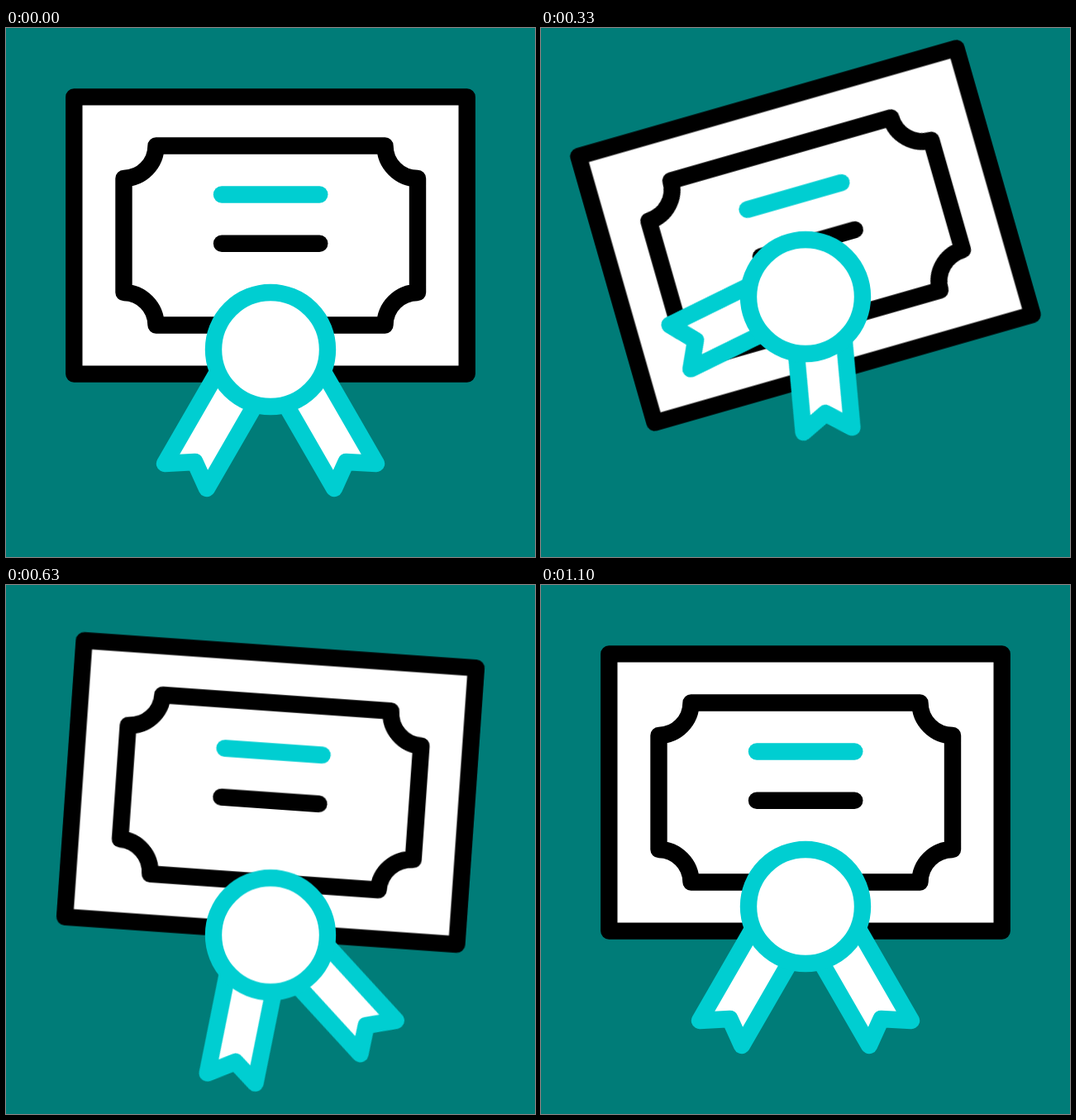
An HTML page without scripts that plays this animation: 640x640 px, repeating every 1670 ms.

```html
<!DOCTYPE html>
<html lang="en">
<head>
<meta charset="utf-8">
<title>Certificate</title>
<style>
  html, body { margin: 0; width: 100%; height: 100%; overflow: hidden; background: #007c78; }
  svg { display: block; width: 100%; height: 100%; }
  .ink, .accent { fill: #fff; stroke: #000; stroke-width: 20.4; stroke-linecap: round; stroke-linejoin: round; }
  .accent { stroke: #00ced1; }

  .cert, .medal, .left, .right, .slide {
    animation: 1.67s cubic-bezier(.37, 0, .63, 1) infinite;
  }
  .cert { transform-origin: 320px 251px; animation-name: rock; }
  .medal { animation-name: bounce; }
  .left { animation-name: swing-left; }
  .right { animation-name: swing-right; }
  .slide { animation-name: slide; }

  @keyframes rock {
    0%, 65.27%, 100% { transform: rotate(0deg); }
    20.36% { transform: rotate(-16deg); }
    32.93% { transform: rotate(7.5deg); }
    44.91% { transform: rotate(-2.4deg); }
    55.69% { transform: rotate(1.75deg); }
  }
  @keyframes bounce {
    0%, 7.96%, 65.87%, 100% { transform: translate(320px, 389px); }
    25.93% { transform: translate(320px, 303px); }
    36.95% { transform: translate(320px, 424px); }
    52.51% { transform: translate(320px, 343px); }
  }
  @keyframes swing-left {
    0%, 8.38%, 65.87%, 100% { transform: rotate(0deg); }
    21.98% { transform: rotate(36deg); }
    40.72% { transform: rotate(-22deg); }
    58.68% { transform: rotate(6deg); }
  }
  @keyframes swing-right {
    0%, 7.19%, 65.87%, 100% { transform: rotate(0deg); }
    20.96% { transform: rotate(25.2deg); }
    35.93% { transform: rotate(-13deg); }
    55.09% { transform: rotate(7.5deg); }
  }
  /* ribbons slip up along their own axis behind the seal */
  @keyframes slide {
    0%, 6.59%, 41.92%, 100% { transform: translate(0px, 0px); }
    20.36%, 28.74% { transform: translate(10.5px, -18.2px); }
  }
</style>
</head>
<body>
<svg viewBox="0 0 640 640">
  <defs>
    <path id="ribbon" class="accent" d="M-60.5 21L-128 138L-91.5 136L-77 168L-12 55.4"/>
  </defs>

  <g class="cert">
    <rect class="ink" x="82.3" y="83.4" width="475.4" height="335.2"/>
    <path class="ink" d="M181.5 142.5H458.5A39.5 39.5 0 0 0 498 182V320A39.5 39.5 0 0 0 458.5 359.5H181.5A39.5 39.5 0 0 0 142.5 320V182A39.5 39.5 0 0 0 181.5 142.5Z"/>
    <path class="accent" d="M261 201.5H379.3"/>
    <path class="ink" d="M261 260.7H379.3"/>
  </g>

  <g class="medal">
    <g class="left">
      <g class="slide"><use href="#ribbon"/></g>
    </g>
    <g class="right">
      <g transform="scale(-1 1)">
        <g class="slide"><use href="#ribbon"/></g>
      </g>
    </g>
    <circle class="accent" r="69"/>
  </g>
</svg>
</body>
</html>
```
